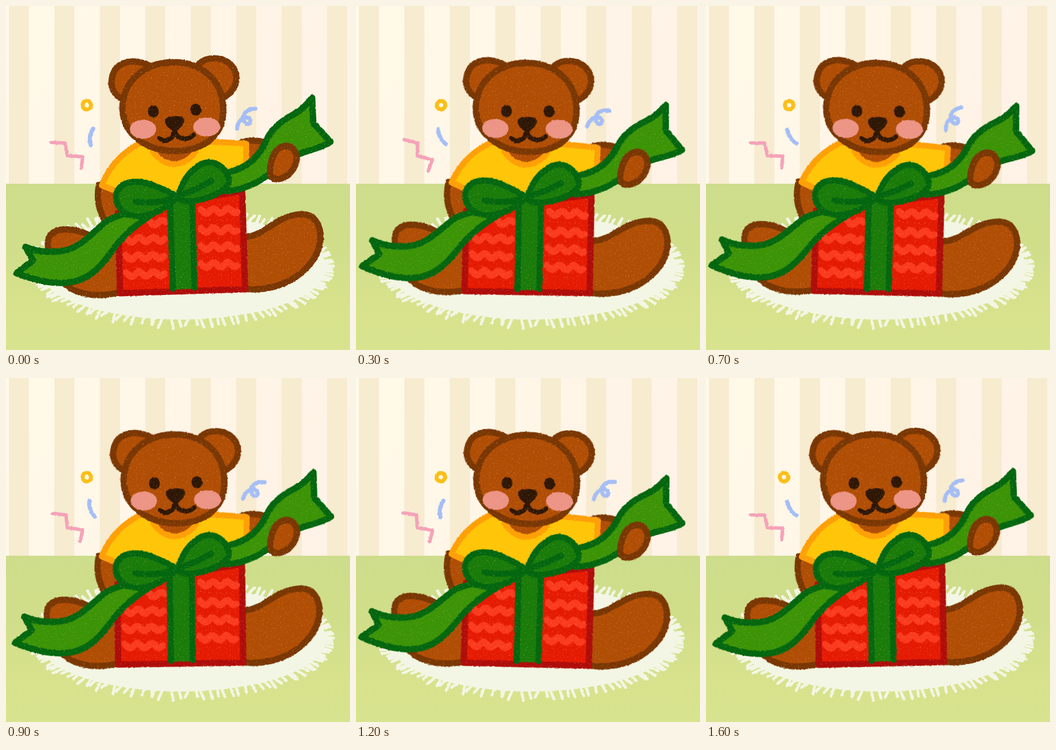
Recreate the animation shown at these times as an HTML page. Size 600 px wide and 600 px high, loop 1700 ms.

```html
<!DOCTYPE html>
<html lang="en">
<head>
<meta charset="utf-8">
<title>Bear unwrapping a gift</title>
<style>
  html, body { margin: 0; width: 100%; height: 100%; overflow: hidden; background: #fff5e7; }
  svg { display: block; width: 100vw; height: 100vh; }
  path, ellipse, circle { stroke-linecap: round; stroke-linejoin: round; }
  .fur { fill: #b04d05; stroke: #793603; stroke-width: 11; }
  .dark { fill: #2e1605; }
  .mouth { fill: none; stroke: #2e1605; stroke-width: 8; }
  .cheek { fill: #ec9486; }
  .shirt { fill: #ffc507; stroke: #fe9f06; stroke-width: 10; }
  .box { fill: #e51a03; stroke: #ae0c0a; stroke-width: 11; }
  .wave { fill: none; stroke: #fa3a1e; stroke-width: 12; }
  .tail { fill: #3b9306; stroke: #02660f; stroke-width: 11; }
  .bow { fill: #197b09; stroke: #02660f; stroke-width: 10.5; }
  .line { fill: none; }
  .blue { fill: none; stroke: #a5bef5; stroke-width: 7; }
  .pink { fill: none; stroke: #f5a2b9; stroke-width: 6; }
  .gold { fill: none; stroke: #fbbf18; stroke-width: 7; }
</style>
</head>
<body>
<svg viewBox="0 0 600 600" preserveAspectRatio="none">
  <defs>
    <linearGradient id="wall" x1="0" y1="0" x2="1" y2="0.3">
      <stop offset="0" stop-color="#fffae8"/>
      <stop offset="0.4" stop-color="#fff7e8"/>
      <stop offset="1" stop-color="#fff2e6"/>
    </linearGradient>
    <linearGradient id="floor" x1="0" y1="0" x2="0" y2="1">
      <stop offset="0" stop-color="#cddd8b"/>
      <stop offset="0.4" stop-color="#d1de89"/>
      <stop offset="0.75" stop-color="#d8e28d"/>
      <stop offset="1" stop-color="#d7e38e"/>
    </linearGradient>
    <filter id="rough" filterUnits="userSpaceOnUse" x="-30" y="-30" width="660" height="660" color-interpolation-filters="sRGB">
      <feTurbulence type="fractalNoise" baseFrequency="0.25" numOctaves="2" seed="4"/>
      <feDisplacementMap in="SourceGraphic" scale="3" xChannelSelector="R" yChannelSelector="G"/>
    </filter>
    <filter id="crayon" filterUnits="userSpaceOnUse" x="-30" y="-30" width="660" height="660" color-interpolation-filters="sRGB">
      <feTurbulence type="fractalNoise" baseFrequency="0.25" numOctaves="2" seed="9" result="noise"/>
      <feDisplacementMap in="SourceGraphic" in2="noise" scale="3" xChannelSelector="R" yChannelSelector="G" result="shape"/>
      <feTurbulence type="fractalNoise" baseFrequency="0.4" numOctaves="2" seed="21"/>
      <feColorMatrix values="0 0 0 0 1  0 0 0 0 0.85  0 0 0 0 0.55  3 0 0 0 -1.85"/>
      <feComponentTransfer><feFuncA type="linear" slope="0.5"/></feComponentTransfer>
      <feComposite operator="atop" in2="shape"/>
    </filter>
  </defs>

  <rect width="600" height="312" fill="url(#wall)"/>
  <g id="stripes" fill="#f7ebd0"></g>
  <rect y="310" width="600" height="290" fill="url(#floor)"/>

  <g filter="url(#rough)" fill="#f3f6e4" stroke="#f3f6e4">
    <ellipse cx="306" cy="456" rx="252" ry="91" stroke="none"/>
    <path id="fringe" fill="none" stroke-width="5"/>
  </g>

  <g id="bits" filter="url(#rough)">
    <circle id="ring" class="gold" cx="141" cy="173" r="7.3"/>
    <path id="zig" class="pink" d="M79 238L103 239L107 261L134 263L131 283"/>
    <path id="arc" class="blue" d="M152 214Q143 228 148 243"/>
    <path id="curl" class="blue" d="M403 214C404 199 416 191 424 196C430 202 424 209 418 204C409 195 416 179 435 179"/>
  </g>

  <g id="bear"><g filter="url(#crayon)">
    <path class="fur" d="M150 402C120 386 85 384 75 404C67 425 86 470 107 488C130 506 165 508 200 499V400Z"/>
    <path class="fur" d="M412 403C450 405 470 363 519 363C545 366 554 395 545 424C530 465 480 501 412 493Z"/>
    <path class="fur" d="M162 312C157 340 163 358 174 377L230 370L205 315Z"/>
    <path class="fur" d="M405 240Q435 228 458 242L440 275H410Z"/>
    <path class="shirt" d="M236 238C204 254 180 280 167 313L195 324L250 340L390 322L419 285V240L368 237Z"/>

    <path class="fur" style="stroke:none" d="M258 245Q272 274 293 275Q316 273 330 245Z"/>
    <path class="shirt line" d="M256 254Q272 275 293 276Q317 274 331 254"/>

    <path class="fur" d="M250 104C228 92 196 94 187 118C178 142 190 158 209 166L250 150Z"/>
    <path class="fur" d="M335 103C345 89 375 86 392 102C410 122 402 150 376 161L340 140Z"/>
    <path class="fur" d="M290 98C340 97 378 128 379 180C380 226 345 252 296 253C245 253 205 225 203 180C203 132 240 99 290 98Z"/>
    <ellipse class="cheek" cx="239" cy="215" rx="23" ry="16.5"/>
    <ellipse class="cheek" cx="350" cy="211" rx="23.5" ry="16.5"/>
    <ellipse class="dark" cx="257" cy="184" rx="9.5" ry="10.5"/>
    <ellipse class="dark" cx="331" cy="181" rx="9.5" ry="10.5"/>
    <path class="dark" d="M278 198C283 191 305 190 310 196C314 204 301 217 294 219C287 217 274 205 278 198Z"/>
    <path class="mouth" d="M268 231C276 239 291 235 294 217C298 234 317 235 327 225"/>

    <path class="box" d="M195 362L412 322L417 494L199 501Z"/>
    <g id="waves"></g>
    <path class="bow" style="stroke:none" d="M288 340H326L329 493L291 495Z"/>
    <path class="bow line" d="M286 345L291 493M325 342L329 491"/>

    <path class="tail" d="M385 291C425 281 440 262 451 240C462 215 478 202 498 191C516 182 524 172 534 160L536 204L566 237C545 251 520 251 500 264C462 288 440 318 384 323Z"/>
    <path class="tail" d="M285 346C240 358 200 358 173 377C148 399 132 417 108 425C84 431 55 430 34 420L47 444L18 466C52 479 82 486 110 482C150 478 172 446 190 420C212 392 240 370 285 346Z"/>
    <path class="bow" d="M300 332C270 318 245 304 220 307C198 309 187 326 194 344C201 366 228 370 248 364C266 360 283 350 300 332Z"/>
    <path class="bow" d="M300 332C307 306 321 286 342 275C364 266 386 284 389 304C388 324 352 336 328 340C315 342 304 340 300 332Z"/>
    <path class="bow line" d="M292 335Q260 346 226 341M306 329Q330 322 358 305"/>
    <path class="fur" d="M487 244C504 243 510 262 505 276C498 294 482 303 470 302C457 300 460 283 463 270C467 254 475 246 487 244Z"/>
  </g></g>
</svg>
<script>
const LOOP = 1700, STEP = 100;
const $ = id => document.getElementById(id);

let seed = 7;
const rnd = () => (seed = seed * 16807 % 2147483647) / 2147483647;

$('stripes').innerHTML = Array.from({ length: 8 }, (_, i) =>
  `<rect x="${5 + i * 79.3}" width="35" height="310"/>`).join('');

// Tassels around the rug
const TASSELS = 120;
let tassels = '';
for (let i = 0; i < TASSELS; i++) {
  const a = (i + rnd() * 0.6) / TASSELS * 2 * Math.PI;
  const b = a + (rnd() - 0.5) * 0.05;
  const len = 8 + rnd() * 8;
  const x = 306 + 248 * Math.cos(a), y = 456 + 88 * Math.sin(a);
  const x2 = 306 + (252 + len) * Math.cos(b), y2 = 456 + (91 + len) * Math.sin(b);
  tassels += `M${x.toFixed(1)} ${y.toFixed(1)}L${x2.toFixed(1)} ${y2.toFixed(1)}`;
}
$('fringe').setAttribute('d', tassels);

// Wavy wrapping paper
function wave(x0, x1, y0) {
  let d = '';
  for (let x = x0; x <= x1; x += 3) {
    const y = y0 - (x - x0) * 0.02 + 4 * Math.sin((x - x0) * 2 * Math.PI / 25 - 0.8);
    d += (d ? 'L' : 'M') + x + ' ' + y.toFixed(1);
  }
  return `<path class="wave" d="${d}"/>`;
}
$('waves').innerHTML =
  [[250, 378], [210, 408], [209, 438], [210, 468]].map(([x, y]) => wave(x, 277, y)).join('') +
  [358, 391, 421, 452].map(y => wave(340, 404, y)).join('');

// Tracks: [time, value] pairs. The bear rocks between turning points 400 ms apart.
const lean = [[0, 0], [100, 0.1], [500, 5.2], [900, 0.95], [1300, 3.6], [1700, 0]];
const times = [0, 200, 500, 700, 900, 1200, 1600];
const track = values => values.map((v, i) => [times[i], v]);
const ringX = track([0, 12, -6, 4, 0, 7, -5]);
const zigTurn = track([0, 11, 12, -2, 4, 6, -2]);
const arcTurn = track([0, -19, -62, -42, -27, 2, -42]);
const curlTurn = track([0, 14, 6, -8, 10, 8, -1]);
const curlX = track([0, 0, 13, 13, 13, 14, 13]);

// Smooth curve through the keys, flat at every turning point
function slope(keys, i) {
  if (i < 1 || i > keys.length - 2) return 0;
  const rate = j => (keys[j + 1][1] - keys[j][1]) / (keys[j + 1][0] - keys[j][0]);
  const a = rate(i - 1), b = rate(i);
  return a * b > 0 ? 2 * a * b / (a + b) : 0;
}

function at(keys, t) {
  let i = 0;
  while (i < keys.length - 2 && t > keys[i + 1][0]) i++;
  const [t0, v0] = keys[i], [t1, v1] = keys[i + 1];
  const span = t1 - t0, u = (t - t0) / span, w = 1 - u;
  return v0 * w * w * (1 + 2 * u) + v1 * u * u * (1 + 2 * w)
    + span * u * w * (slope(keys, i) * w - slope(keys, i + 1) * u);
}

const move = (id, value) => $(id).setAttribute('transform', value);

function pose(t) {
  move('bear', `rotate(${at(lean, t)} 271 300)`);
  move('ring', `translate(${at(ringX, t)} 0)`);
  move('zig', `rotate(${at(zigTurn, t)} 106 261)`);
  move('arc', `rotate(${at(arcTurn, t)} 149 228)`);
  move('curl', `translate(${at(curlX, t)} 0) rotate(${at(curlTurn, t)} 420 198)`);
}

const start = performance.now();
let shown = -1;
function tick() {
  const n = Math.floor((performance.now() - start) % LOOP / STEP);
  if (n !== shown) pose((shown = n) * STEP);
  requestAnimationFrame(tick);
}
tick();
</script>
</body>
</html>
```
